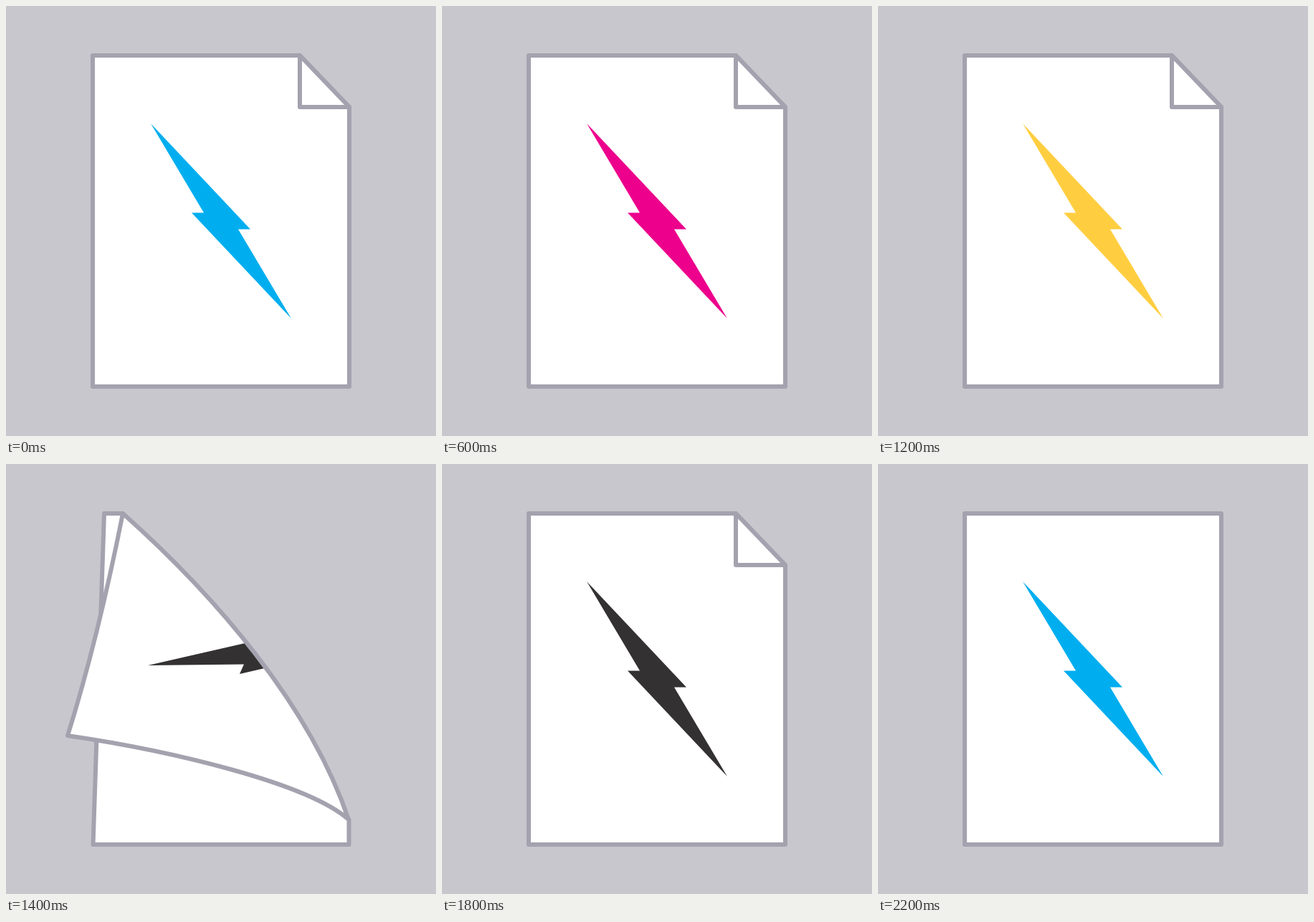
An HTML page with a canvas that plays this animation: 600 px wide and 600 px high, repeating every 2.4 s.

```html
<!DOCTYPE html>
<html lang="en">
<head>
<meta charset="utf-8">
<title>Page turn</title>
<style>
  html, body { margin: 0; width: 100%; height: 100%; overflow: hidden; background: #c7c7cd; }
  canvas { display: block; width: 600px; height: 600px; }
</style>
</head>
<body>
<canvas id="stage"></canvas>
<script>
const STEP = 100;
const STEPS_PER_TURN = 6;
const INKS = ['#00aeef', '#ec008c', '#ffce40', '#343132'];
const BOLT = 'M202 164L341 311.500H324L398 436L259 288.500H276Z';

// ink: 0 = colour of the current side, 1 = colour of the next side
const layer = (shape, bolt, ink) => ({
  shape: new Path2D(shape),
  bolt: bolt && new Path2D(bolt),
  ink
});

const corner = [
  layer('M121 69H410L479 141V531H121Z', BOLT, 0),
  layer('M410 69V141H479Z')
];

const lift = [
  layer('M121 69H287L479 319V531H121Z', BOLT, 0),
  layer('M287 69Q408 172 479 319Q380 276 239 258Q268 165 287 69Z',
    'M355 190L410 171L430 190Z', 1)
];

const fold = [
  layer('M137 69H163L478.500 496V531H121.500Z'),
  layer('M163 69C290 182 424 336 478 496C420 445 230 400 86 379Q128 245 163 69Z',
    'M198 281L351 246L378 281L326 293L332 279.500Z', 1)
];

const sweep = [
  layer('M309 310Q268 430 208 483Q285 525 349 530L400 400Z'),
  layer('M430 54C300 45 140 50 86 140C322 212 360 390 349 530H440C495 430 455 200 430 54Z',
    'M373 134L466 273L470 281L459 279L468 294L480 353L414 257H426Z', 1)
];

const flat = [layer('M121 69H479V531H121Z', BOLT, 1)];

const POSES = [corner, lift, fold, sweep, flat, flat];

const canvas = document.getElementById('stage');
const ctx = canvas.getContext('2d');
const ratio = window.devicePixelRatio || 1;
canvas.width = canvas.height = 600 * ratio;
ctx.scale(ratio, ratio);
ctx.lineWidth = 6;
ctx.lineJoin = 'round';
ctx.strokeStyle = '#a3a2ae';

function drawLayer({ shape, bolt, ink }, turn) {
  ctx.fillStyle = '#fff';
  ctx.fill(shape);
  if (bolt) {
    ctx.save();
    ctx.clip(shape);
    ctx.fillStyle = INKS[(turn + ink) % INKS.length];
    ctx.fill(bolt);
    ctx.restore();
  }
  ctx.stroke(shape);
}

function draw(time) {
  const step = Math.floor(time / STEP) % (STEPS_PER_TURN * INKS.length);
  const turn = Math.floor(step / STEPS_PER_TURN);
  ctx.fillStyle = '#c7c7cd';
  ctx.fillRect(0, 0, 600, 600);
  POSES[step % STEPS_PER_TURN].forEach(part => drawLayer(part, turn));
}

const start = performance.now();
function tick() {
  draw(performance.now() - start);
  requestAnimationFrame(tick);
}
tick();
</script>
</body>
</html>
```
